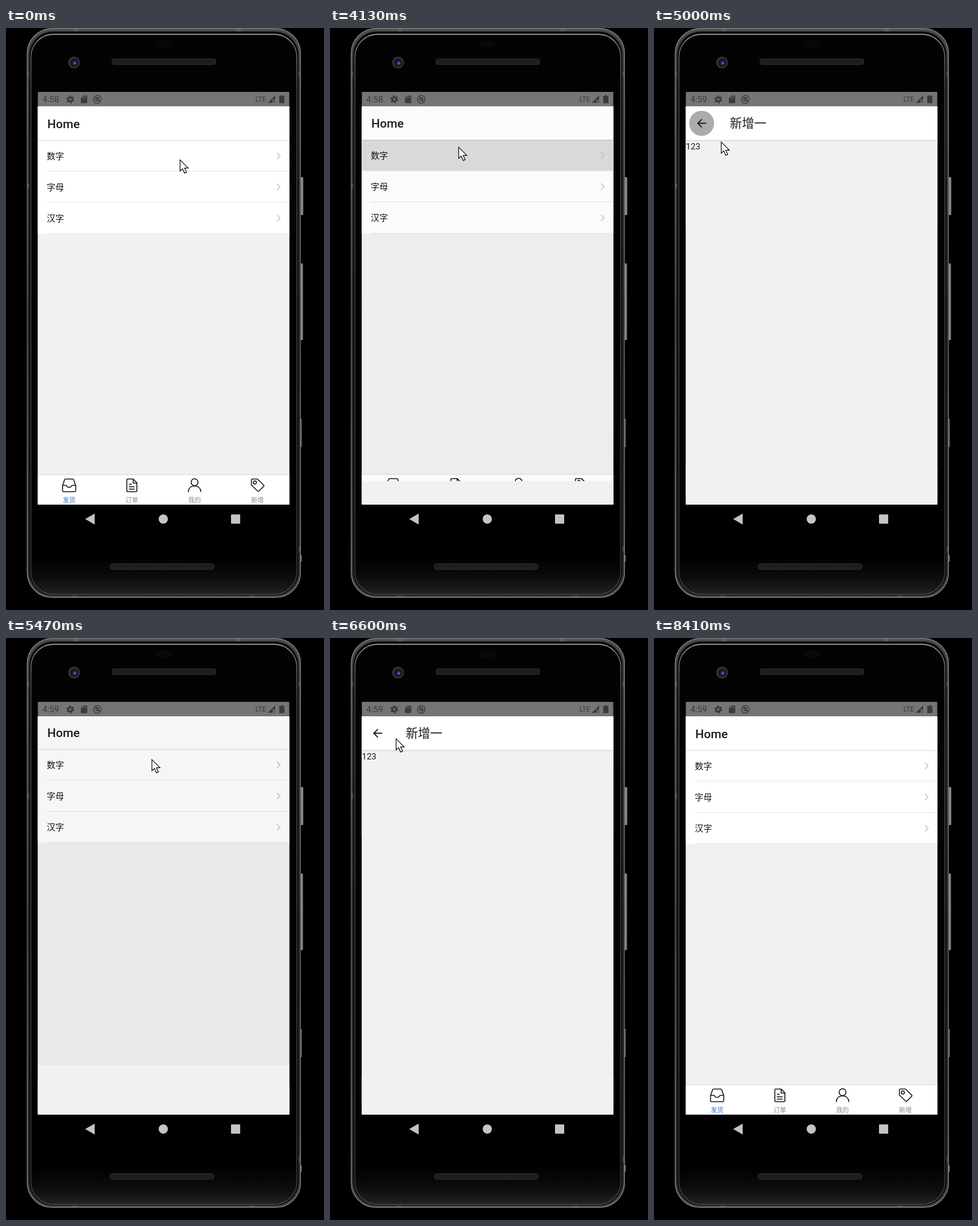
An HTML page that plays this animation: 554 by 1011 pixels, repeating every 8.45 s.

```html
<!DOCTYPE html>
<html lang="zh">
<head>
<meta charset="utf-8">
<style>
  html, body { margin: 0; height: 100%; overflow: hidden; background: #000; }
  svg { display: block; }
  text { font-family: Roboto, "Noto Sans CJK SC", "Noto Sans CJK", sans-serif; }
  .icon { fill: none; stroke: #111; stroke-width: 1.6; stroke-linejoin: round; stroke-linecap: round; }
</style>
</head>
<body>
<svg width="554" height="1011" viewBox="0 0 554 1011">
  <defs>
    <linearGradient id="side" x2="0" y2="1">
      <stop offset="0" stop-color="#4c4c4c"/><stop offset=".08" stop-color="#3a3a3a"/>
      <stop offset=".5" stop-color="#262626"/><stop offset=".95" stop-color="#2c2c2c"/>
      <stop offset="1" stop-color="#444"/>
    </linearGradient>
    <linearGradient id="edge" x2="0" y2="1">
      <stop offset="0" stop-color="#8a8a8a"/><stop offset=".06" stop-color="#808080"/>
      <stop offset=".5" stop-color="#5c5c5c"/><stop offset="1" stop-color="#888"/>
    </linearGradient>
    <linearGradient id="glass" x2="0" y2="1">
      <stop offset="0" stop-color="#030303"/><stop offset=".93" stop-color="#000"/>
      <stop offset=".97" stop-color="#0c0c0c"/><stop offset="1" stop-color="#222"/>
    </linearGradient>
    <linearGradient id="rim" x2="0" y2="1">
      <stop offset="0" stop-color="#b8b8b8"/><stop offset=".02" stop-color="#777"/>
      <stop offset=".1" stop-color="#4a4a4a"/><stop offset=".96" stop-color="#3a3a3a"/>
      <stop offset="1" stop-color="#505050"/>
    </linearGradient>
    <linearGradient id="key">
      <stop offset="0" stop-color="#333"/><stop offset=".5" stop-color="#999"/><stop offset="1" stop-color="#666"/>
    </linearGradient>
    <linearGradient id="shade" x2="0" y2="1">
      <stop offset="0" stop-color="#000" stop-opacity=".13"/><stop offset="1" stop-color="#000" stop-opacity="0"/>
    </linearGradient>
    <radialGradient id="lens" fx=".58" fy=".57">
      <stop offset="0" stop-color="#9fb0e8"/><stop offset=".14" stop-color="#3a4690"/>
      <stop offset=".38" stop-color="#15183a"/><stop offset=".62" stop-color="#141418"/>
      <stop offset=".82" stop-color="#3c3c3e"/><stop offset="1" stop-color="#1c1c1e"/>
    </radialGradient>
    <pattern id="mesh" width="3" height="3" patternUnits="userSpaceOnUse">
      <path fill="#11100f" d="M0 0h3v3H0z"/><path fill="#2c2b28" d="M0 0h1.5v1.5H0zM1.5 1.5H3V3H1.5z"/>
    </pattern>
  </defs>

  <!-- phone body -->
  <g fill="url(#key)">
    <rect x="512" y="259" width="6" height="66" rx="1.5"/>
    <rect x="511" y="409" width="6.5" height="133" rx="1.5"/>
    <rect x="512" y="679" width="3" height="49"/>
    <rect x="512" y="916" width="3" height="11"/>
  </g>
  <rect x="37" y="1" width="476" height="988" rx="43" fill="url(#side)" stroke="url(#edge)" stroke-width="1.5"/>
  <path d="M37 80h6M37 274h6M507 80h6M507 905h6M122 1v7M405 1v7M120 982v7M428 982v7" stroke="#808080" stroke-width="9" opacity=".35"/>
  <rect x="40.5" y="6" width="469" height="980" rx="41" fill="#0b0b0b"/>
  <rect x="43.5" y="11" width="463" height="973" rx="39" fill="url(#glass)" stroke="url(#rim)" stroke-width="1.5"/>
  <rect x="260" y="22" width="29" height="12" rx="6" fill="#08080c"/>
  <circle cx="118.5" cy="60" r="10.5" fill="url(#lens)"/>
  <g fill="url(#mesh)" stroke="#2f2e2b">
    <rect x="184.5" y="53.5" width="181" height="10" rx="4"/>
    <rect x="181.5" y="930.5" width="181" height="10" rx="4"/>
  </g>
  <g fill="#c4c4c4">
    <path d="M138 853l16.5-9.5v19z"/><circle cx="274" cy="853" r="8"/>
    <rect x="392" y="845" width="16" height="16" rx="1"/>
  </g>

  <!-- status bar -->
  <path fill="#757575" d="M55.500 111h438v25h-438z"/>
  <g fill="#3b3b3b">
    <text id="clock" x="63.5" y="129" font-size="15"></text>
    <text x="434.5" y="128" font-size="12">LTE</text>
    <circle cx="112" cy="124" r="3.6" fill="none" stroke="#3b3b3b" stroke-width="3"/>
    <circle cx="112" cy="124" r="5.7" fill="none" stroke="#3b3b3b" stroke-width="2.4" stroke-dasharray="3 2.97"/>
    <path d="M135 117.500h5.500q1 0 1 1v11q0 1-1 1h-9q-1 0-1-1v-7.500z"/>
    <path stroke="#757575" stroke-width="1" d="M134.500 119v3M136.800 119v3M139 119v3"/>
    <path d="M469 117v13h-13z"/>
    <path d="M464 124l5 6M469 124l-5 6" stroke="#757575" stroke-width="1.2"/>
    <path d="M479 116.500h3v1.500h3v12.500h-9V118h3z"/>
  </g>
  <g fill="none" stroke="#3b3b3b" stroke-width="1.5">
    <circle cx="159" cy="124" r="6.700"/><circle cx="159" cy="123.500" r="2.800"/><path d="M156 120l7 8"/>
  </g>

  <!-- app -->
  <svg x="55.500" y="136" width="438" height="692" viewBox="55.500 136 438 692">
    <path fill="#f1f1f1" d="M55 136h439v692H55z"/>
    <g id="home">
      <path fill="#f1f1f1" d="M55 136h439v706H55z"/>
      <path fill="#fff" d="M55 136h439v222H55z"/>
      <path id="pressed" fill="#dcdcdc" d="M55 195h439v54H55z"/>
      <g id="rows"></g>
      <path fill="url(#shade)" d="M55 194.500h439v3H55z"/>
      <text x="72" y="173.800" font-size="21" font-weight="500" fill="#1c1c1e">Home</text>
      <path fill="#e4e4e4" d="M55 775h439v2H55z"/>
      <path fill="#fff" d="M55 777h439v51H55z"/>
      <g class="icon">
        <path d="M98.500 795l3.500-10q.5-1.500 2-1.500h12q1.500 0 2 1.500l3.500 10v8.500q0 2-2 2h-19q-2 0-2-2zM98.500 794.500h6.500q1.500 3.500 5 3.500t5-3.500h6.500"/>
        <path d="M212 783.500h9.500l6.500 6.500v14q0 1.500-1.500 1.500H212q-1.500 0-1.500-1.500v-19q0-1.500 1.500-1.500zM221.500 784v6.500h6.500M214.500 792.500h4M214.500 797h9M214.500 801h9"/>
        <circle cx="328.500" cy="789" r="6"/><path d="M317.500 805.500q1-10 11-10t11 10"/>
        <path d="M427.500 785q0-1.500 1.500-1.500h9l11 10.500q1 1 0 2l-8.500 8.500q-1 1-2 0l-11-10.500z"/><circle cx="433.500" cy="789.500" r="2.700"/>
      </g>
      <g id="tabs" font-size="11" text-anchor="middle"></g>
    </g>
    <path id="dim" d="M55 136h439v692H55z"/>
    <svg id="card" x="55.500" y="136" width="438" height="692" viewBox="55.500 136 438 692">
      <g id="detail">
        <path fill="#f1f1f1" d="M55 136h439v692H55z"/>
        <path fill="#fff" d="M55 136h439v59H55z"/>
        <path fill="url(#shade)" d="M55 194.500h439v3H55z"/>
        <circle id="ripple" cx="83" cy="165.500" r="21.800"/>
        <path d="M91 165.500H76.500M83.500 158.300l-7.200 7.200 7.200 7.200" fill="none" stroke="#1c1c1e" stroke-width="1.900"/>
        <text x="132" y="173" font-size="21.300" fill="#1c1c1e">新增一</text>
        <text x="55.500" y="211" font-size="15" fill="#1c1c1e">123</text>
      </g>
    </svg>
  </svg>

  <path id="cursor" d="M.2 .2V19.500l4.400-4 3.500 7.600 3.300-1.500-3.400-7.300h6.300z" fill="#fff" stroke="#000" stroke-width="1.200"/>
</svg>

<script>
const $ = id => document.getElementById(id);
const LOOP = 8450, TOP = 136, HEIGHT = 692, DURATION = 425;
const OPENS = [4124.6, 6104], CLOSES = [5313, 7261];
const PRESSES = [[4010, 4230], [5980, 6095]];
const TAPS = [4860, 6880];
const CURSOR_END = 7640;

// time, x, y of the pointer
const POINTER = [
  [0, 303, 229], [100, 303, 229], [170, 306, 231], [260, 304, 230], [1900, 304, 230],
  [2170, 310, 57], [2740, 310, 57], [3200, 449, 250], [3900, 224, 207], [4220, 224, 207],
  [4750, 84, 167], [4890, 84, 167], [5000, 117, 198], [5500, 255, 211], [6200, 255, 211],
  [6750, 84, 167], [7120, 84, 167], [7340, 215, 182], [CURSOR_END, 290, 100]
];

$('rows').innerHTML = ['数字', '字母', '汉字'].map((label, i) => {
  const y = 222 + i * 54.3;
  return `<text x="71" y="${y + 5.5}" font-size="15" fill="#111">${label}</text>
    <path d="M472 ${y - 5.5}l5.500 5.500-5.500 5.500" fill="none" stroke="#bdbdc2" stroke-width="1.400"/>
    <path d="M71 ${y + 26.7}H491" stroke="#e2e2e2"/>`;
}).join('');

$('tabs').innerHTML = ['发货', '订单', '我的', '新增'].map((label, i) =>
  `<text x="${110 + i * 109.3}" y="824" fill="${i ? '#8c8c8c' : '#3574d6'}">${label}</text>`).join('');

const clamp = v => Math.min(1, Math.max(0, v));
const smooth = v => v * v * (3 - 2 * v);
const bezier = (a, b, s) => 3 * (1 - s) ** 2 * s * a + 3 * (1 - s) * s * s * b + s ** 3;

function ease(x) {
  if (x <= 0) return 0;
  if (x >= 1) return 1;
  let low = 0, high = 1;
  for (let i = 0; i < 24; i++) {
    const mid = (low + high) / 2;
    if (bezier(.20833, .25, mid) < x) low = mid; else high = mid;
  }
  return bezier(.82, 1, low);
}

function pointerAt(t) {
  const i = POINTER.findIndex(k => k[0] > t);
  const [t0, x0, y0] = POINTER[i - 1], [t1, x1, y1] = POINTER[i];
  const k = smooth((t - t0) / (t1 - t0));
  return [x0 + (x1 - x0) * k, y0 + (y1 - y0) * k];
}

function render(t) {
  const sum = starts => starts.reduce((total, start) => total + ease((t - start) / DURATION), 0);
  const progress = clamp(sum(OPENS) - sum(CLOSES));
  const hidden = 1 - progress;

  $('home').setAttribute('transform', `translate(0 ${-.02 * HEIGHT * progress})`);
  $('dim').setAttribute('opacity', .1 * clamp(progress / .36));
  $('card').setAttribute('y', TOP + HEIGHT * hidden);
  $('detail').setAttribute('transform', `translate(0 ${-.959 * HEIGHT * hidden})`);
  $('card').style.display = progress ? '' : 'none';

  $('pressed').style.display = PRESSES.some(([a, b]) => t >= a && t < b) ? '' : 'none';
  $('ripple').setAttribute('opacity', .33 * Math.max(...TAPS.map(tap =>
    clamp((t - tap) / 80) * clamp((tap + 340 - t) / 150))));
  $('clock').textContent = t < 4560 ? '4:58' : '4:59';

  const visible = t < CURSOR_END;
  $('cursor').style.display = visible ? '' : 'none';
  if (visible) $('cursor').setAttribute('transform', `translate(${pointerAt(t).map(Math.round)})`);
}

const start = performance.now();
function tick() {
  render((performance.now() - start) % LOOP);
  requestAnimationFrame(tick);
}
tick();
</script>
</body>
</html>
```
